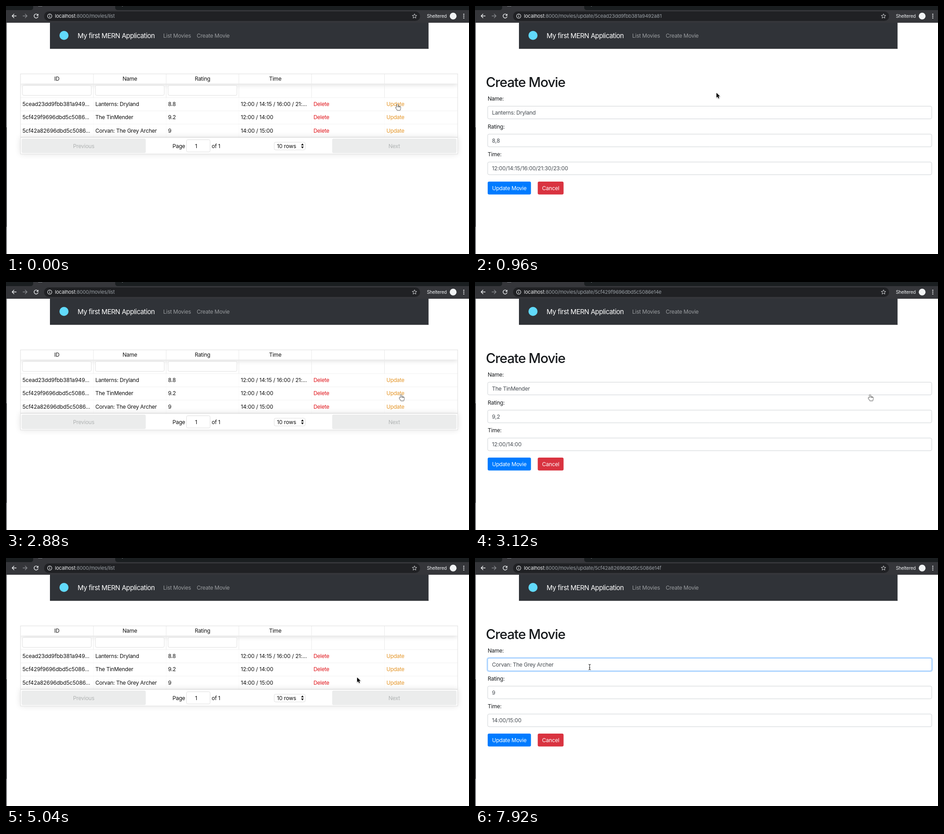
Recreate the animation shown at these times as an HTML page with a canvas. Size 1022 by 548 pixels, loop 8 s.

```html
<!DOCTYPE html>
<html lang="en">
<head>
<meta charset="utf-8">
<title>Movie list</title>
<style>
html, body { margin: 0; width: 100%; height: 100%; overflow: hidden; background: #fff; }
canvas { display: block; width: 1022px; height: 548px; }
</style>
</head>
<body>
<canvas id="stage"></canvas>
<script>
const W = 1022, H = 548, LOOP = 8000, STEP = 80;
const canvas = document.getElementById('stage');
const ctx = canvas.getContext('2d');
const dpr = window.devicePixelRatio || 1;
canvas.width = W * dpr;
canvas.height = H * dpr;

const movies = [
  { id: '5cead23dd9fbb381a9492a81', name: 'Lanterns: Dryland', rating: '8.8',
    short: '12:00 / 14:15 / 16:00 / 21:...', times: '12:00/14:15/16:00/21:30/23:00' },
  { id: '5cf429f9696dbd5c5086e14e', name: 'The TinMender', rating: '9.2',
    short: '12:00 / 14:00', times: '12:00/14:00' },
  { id: '5cf42a82696dbd5c5086e14f', name: 'Corvan: The Grey Archer', rating: '9',
    short: '14:00 / 15:00', times: '14:00/15:00' }
];

// start time, page, movie index
const scenes = [
  [0, 'list'], [80, 'blank', 0], [160, 'form', 0],
  [2000, 'blank'], [2240, 'list'], [3040, 'blank', 1], [3120, 'form', 1],
  [4320, 'blank'], [4560, 'list'], [5600, 'blank', 2], [5680, 'form', 2]
];

// time, x, y of the hot spot, pointer shape from then on
const path = [
  [0, 864, 217, 'hand'], [640, 864, 217, 'arrow'], [800, 730, 198, 'arrow'],
  [960, 533, 192, 'arrow'], [1200, 395, 235, 'arrow'], [1520, 235, 350, 'arrow'],
  [1760, 162, 400, 'hand'], [2240, 162, 400, 'arrow'], [2400, 430, 305, 'arrow'],
  [2560, 735, 248, 'arrow'], [2640, 845, 231, 'hand'], [2720, 890, 228, 'hand'],
  [2880, 872, 249, 'hand'], [3200, 872, 249, 'arrow'], [3360, 760, 300, 'arrow'],
  [3600, 450, 375, 'arrow'], [3840, 230, 400, 'arrow'], [4080, 165, 408, 'hand'],
  [4480, 165, 408, 'arrow'], [4720, 474, 346, 'arrow'], [4880, 650, 293, 'arrow'],
  [5040, 775, 264, 'arrow'], [5120, 825, 247, 'arrow'], [5200, 850, 250, 'hand'],
  [5360, 855, 274, 'hand'], [6160, 855, 274, 'arrow'], [6400, 690, 258, 'arrow'],
  [6640, 420, 245, 'beam'], [6960, 253, 241, 'beam'], [LOOP, 253, 241, 'beam']
];

// size, tracking in em, weight
const BODY = [12, -0.021, 400], DIGITS = [12, -0.009, 400], URL_FONT = [11, -0.02, 400];
const TITLE = [14.8, -0.034, 400], HEAD = [29.5, -0.036, 500], TAB = [10, -0.02, 400];

function text(str, x, y, color = '#111', font = BODY, align = 'left') {
  const [size, track, weight] = font;
  ctx.font = `${weight} ${size}px Inter, Roboto, sans-serif`;
  ctx.letterSpacing = size * track + 'px';
  ctx.textAlign = align;
  ctx.fillStyle = color;
  ctx.fillText(str, x, y);
  return ctx.measureText(str).width;
}

function rect(x, y, w, h, color) {
  ctx.fillStyle = color;
  ctx.fillRect(x, y, w, h);
}

function box(x, y, w, h, r, fill, stroke) {
  ctx.beginPath();
  ctx.roundRect(x, y, w, h, r);
  if (fill) { ctx.fillStyle = fill; ctx.fill(); }
  if (stroke) { ctx.strokeStyle = stroke; ctx.lineWidth = 1; ctx.stroke(); }
}

function dot(x, y, r, color) {
  ctx.beginPath();
  ctx.arc(x, y, r, 0, 7);
  ctx.fillStyle = color;
  ctx.fill();
}

function line(d, color, width = 1.4) {
  ctx.strokeStyle = color;
  ctx.lineWidth = width;
  ctx.stroke(new Path2D(d));
}

function shadow(color, blur, y = 0) {
  ctx.shadowColor = color;
  ctx.shadowBlur = blur * dpr;
  ctx.shadowOffsetY = y * dpr;
}

function browser(url, loading) {
  rect(0, 0, W, 9, '#1a1e20');
  rect(0, 9, W, 28, '#35363a');
  ctx.fillStyle = '#35363a';
  ctx.fill(new Path2D('M54 9Q60 9 60 3V0H241V3Q241 9 247 9Z'));
  text(loading ? 'localhost' + url : 'React App', 88, -2, '#c8cacd', TAB);
  rect(71, 0, 9, 1, '#777b80');
  rect(256, 0, 2, 1, '#777b80');

  const light = '#eceef0';
  line('M23 22H13.5M18 17.5L13.5 22L18 26.5', light);
  line('M37 22H46.5M42 17.5L46.5 22L42 26.5', '#85888c');
  if (loading) {
    line('M62 18L70.5 26.5M70.5 18L62 26.5', light, 1.5);
  } else {
    line('M70 19.2A4.5 4.5 0 1 0 70.9 23.2', light);
    ctx.fillStyle = light;
    ctx.fill(new Path2D('M71.5 17V21.6H66.9Z'));
  }

  box(84, 12, 830, 21, 10.5, '#202124');
  line('M101.2 22.3A4.7 4.7 0 1 1 91.8 22.3A4.7 4.7 0 1 1 101.2 22.3', light, 1.1);
  line('M96.5 21.6V25M96.5 19.3V20.5', light, 1.2);
  const host = text('localhost', 108, 26, light, URL_FONT);
  text(url, 108 + host, 26, '#9aa0a6', URL_FONT);

  ctx.beginPath();
  for (let i = 0; i < 10; i++) {
    const r = i % 2 ? 2.3 : 5.3, a = i * Math.PI / 5 - Math.PI / 2;
    ctx.lineTo(901.7 + r * Math.cos(a), 22.5 + r * Math.sin(a));
  }
  ctx.closePath();
  ctx.strokeStyle = '#d5d7da';
  ctx.lineWidth = 1;
  ctx.stroke();
  text('Sheltered', 929, 26, light, [10.2, -0.025, 400]);
  dot(987, 22.3, 7.5, '#f1f3f4');
  for (const y of [18.2, 22.3, 26.4]) dot(1010.5, y, 1.2, light);
}

function navbar() {
  rect(97, 37, 835.7, 57.6, '#303338');
  rect(97, 93, 835.7, 1, '#25282c');
  dot(128, 65, 10, '#61dafb');
  text('My first MERN Application', 158, 70.5, '#fff', TITLE);
  text('List Movies', 347, 69.8, '#999c9f');
  text('Create Movie', 421, 69.8, '#999c9f');
}

function table() {
  const cols = [32, 193, 353.5, 514, 674.5, 835.5];
  const edge = '#dedede', faint = '#f1f1f1';

  ctx.save();
  ctx.beginPath();
  ctx.rect(32, 150, 965, 52);
  ctx.clip();
  shadow('rgba(0,0,0,.15)', 12, 2);
  rect(32, 150, 965, 21.5, '#fff');
  ctx.restore();
  for (const x of cols.slice(1)) {
    rect(x - .5, 150, 1, 52, '#eaeaea');
    rect(x - .5, 202, 1, 88, '#fafafa');
  }
  ['ID', 'Name', 'Rating', 'Time'].forEach((label, i) =>
    text(label, cols[i] + 80.3, 165.3, '#111', BODY, 'center'));
  for (let i = 0; i < 3; i++) box(cols[i] + 4.3, 175.5, 152, 22, 3, '#fff', '#dfdfdf');

  movies.forEach((m, row) => {
    const top = 202 + 29.2 * row;
    rect(32, top, 965, 1, faint);
    const cells = [
      [m.id.slice(0, 20) + '...', '#111', DIGITS], [m.name], [m.rating],
      [m.short, '#111', DIGITS], ['Delete', '#e0141a'], ['Update', '#e5972b']
    ];
    cells.forEach(([str, color, font], c) => text(str, cols[c] + 4.2, top + 19.2, color, font));
  });

  ctx.save();
  shadow('rgba(0,0,0,.12)', 14);
  rect(32, 290, 965, 37, '#fff');
  ctx.restore();
  rect(32, 289.5, 965, 1.5, '#dcdcdc');
  ctx.strokeStyle = edge;
  ctx.lineWidth = 1;
  ctx.strokeRect(32, 150, 965, 177);

  box(34.5, 293, 274, 32, 3, '#ebecec');
  box(720, 293, 274.5, 32, 3, '#ebecec');
  text('Previous', 171.5, 313.5, '#b0b3b3', BODY, 'center');
  text('Next', 857, 313.5, '#b0b3b3', BODY, 'center');
  text('Page', 367.5, 313.5);
  box(398.5, 295.5, 52, 27, 3, '#fff', edge);
  text('1', 419.5, 313.5, '#111', BODY, 'center');
  text('of 1', 454, 313.5);
  box(592, 301, 68.5, 17, 3, '#fff', edge);
  text('10 rows', 598, 313.5, '#111', DIGITS);
  ctx.fillStyle = '#111';
  ctx.fill(new Path2D('M651.3 308L654.3 303.7L657.3 308ZM651.3 310.5L654.3 314.8L657.3 310.5Z'));
}

function button(label, x, w, color) {
  box(x, 388, w, 28.5, 3.2, color);
  text(label, x + w / 2, 406.6, '#fff', BODY, 'center');
}

function form(movie, focus, caret, hover) {
  text('Create Movie', 24, 179, '#16191c', HEAD);
  const fields = [
    ['Name:', movie.name, BODY],
    ['Rating:', movie.rating.replace('.', ','), DIGITS],
    ['Time:', movie.times, DIGITS]
  ];
  fields.forEach(([label, value, font], i) => {
    const y = 221.2 + i * 61.7;
    text(label, 28, y - 12.2, '#16191c');
    if (i === 0 && focus) box(25.6, y - 2, 985, 32.6, 5, `rgba(0,123,255,${.25 * focus})`);
    box(28, y + .2, 980.2, 28, 3.2, '#fff', i === 0 && focus ? '#80bdff' : '#ced2d6');
    const w = text(value, 37.5, y + 18.6, '#454b51', font);
    if (i === 0 && caret) rect(38 + w, y + 7.5, 1, 13.5, '#222');
  });
  button('Update Movie', 28, 95.5, '#007bff');
  button('Cancel', 138.5, 57, hover ? '#c82333' : '#d93340');
}

const shapes = {
  arrow: 'M0 0V10.6L2.5 8.3L4.3 12.3L6.1 11.5L4.4 7.6H7.8Z',
  hand: 'M-1.2 7V1.2Q-1.2 0 0 0T1.2 1.2V4.2Q2.2 3.6 3.2 4.6Q4.2 4.1 5 5.2Q6.8 4.9 6.8 6.8V8.5' +
    'Q6.8 10.5 5.6 13H-.2Q-1.6 10.6 -3.6 8Q-4.2 6.4 -2.6 6.3Z',
  beam: 'M-2.6 -6Q0 -6 0 -4.6Q0 -6 2.6 -6M0 -4.6V4.6M-2.6 6Q0 6 0 4.6Q0 6 2.6 6M-1.3 1.5H1.3'
};

function pointer(p) {
  const shape = new Path2D(shapes[p.kind]);
  ctx.save();
  ctx.translate(p.x, p.y);
  ctx.lineJoin = 'round';
  if (p.kind === 'beam') {
    ctx.strokeStyle = '#222';
    ctx.lineWidth = 1.1;
    ctx.stroke(shape);
  } else {
    const hand = p.kind === 'hand';
    shadow('rgba(0,0,0,.3)', 2, 1);
    ctx.strokeStyle = hand ? '#111' : '#fff';
    ctx.lineWidth = hand ? 1.1 : 1.5;
    ctx.stroke(shape);
    shadow('transparent', 0);
    ctx.fillStyle = hand ? '#fff' : '#000';
    ctx.fill(shape);
    if (hand) line('M1.2 4.2V6.6M3.2 4.6V6.8M5 5.2V7', '#111', .8);
  }
  ctx.restore();
}

function pointerAt(t) {
  const i = path.findIndex(k => k[0] > t) - 1;
  const [t0, x0, y0, kind] = path[i], [t1, x1, y1] = path[i + 1];
  const u = (t - t0) / (t1 - t0);
  return { x: x0 + (x1 - x0) * u, y: y0 + (y1 - y0) * u, kind };
}

function draw(t) {
  const [, page, index] = scenes.filter(s => s[0] <= t).pop();
  const movie = movies[index];
  const p = pointerAt(t);
  ctx.setTransform(dpr, 0, 0, dpr, 0, 0);
  rect(0, 0, W, H, '#fff');
  rect(0, 37, 1.4, H - 37, '#303236');
  rect(0, 268, 1.4, 220, '#111214');
  browser(':8000/movies/' + (movie ? 'update/' + movie.id : 'list'), page === 'blank');
  navbar();
  if (page === 'list') table();
  if (page === 'form') {
    const focus = Math.max(0, Math.min(1, (t - 7280) / 160));
    const hover = p.kind === 'hand' && p.y > 388 && p.x < 196;
    form(movie, focus, t >= 7360 && t < 7840, hover);
  }
  pointer(p);
}

function tick(now) {
  draw(Math.floor((now % LOOP) / STEP) * STEP);
  requestAnimationFrame(tick);
}
requestAnimationFrame(tick);
</script>
</body>
</html>
```
